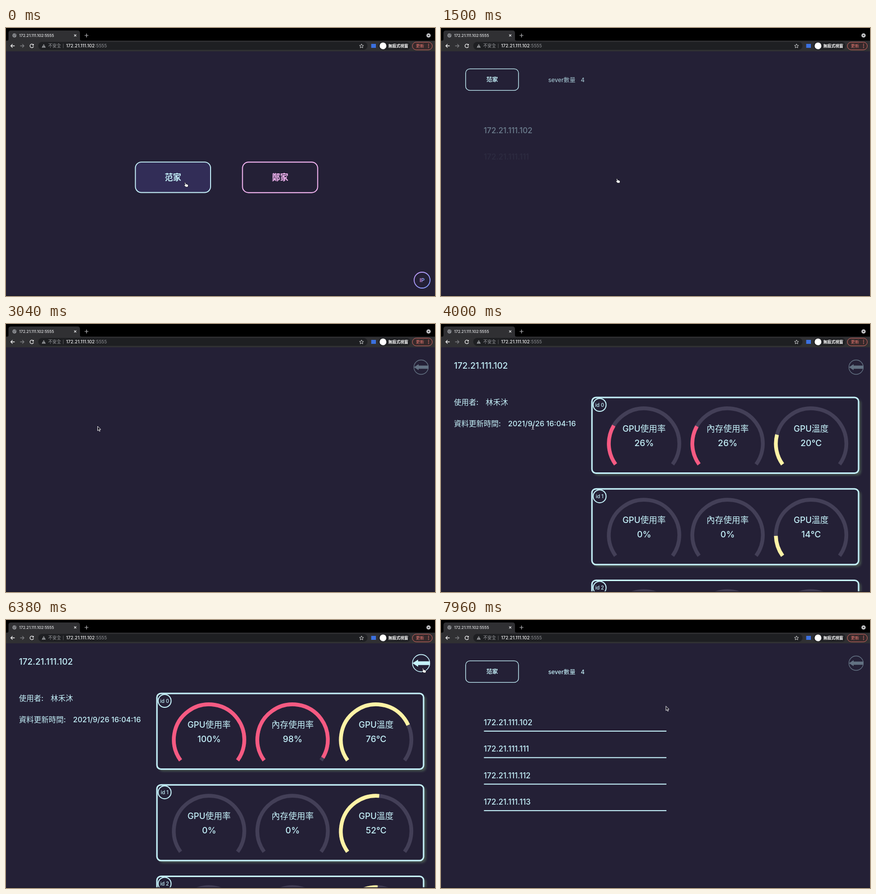
Animation, 864 px wide and 540 px high, one loop 8000 ms. Source, as an HTML page:

```html
<!DOCTYPE html>
<html lang="zh-Hant">
<head>
<meta charset="utf-8">
<title>Server monitor</title>
<style>
  html, body { margin: 0; width: 100%; height: 100%; overflow: hidden; background: #242036; }
  svg { display: block; width: 864px; height: 540px; font-family: Inter, "Noto Sans CJK TC", "Noto Sans CJK", sans-serif; }
  .shadow { filter: blur(2px); }
</style>
</head>
<body>
<svg id="stage" viewBox="0 0 864 540"></svg>
<script>
const LOOP = 8000;
const ICE = '#c5f1fa', PINK = '#f9b9f7', PAGE = '#242036';
const HOST = '172.21.111.102';
const HOSTS = [HOST, '172.21.111.111', '172.21.111.112', '172.21.111.113'];
const GAUGES = [
  { label: 'GPU使用率', unit: '%', color: '#f65a82' },
  { label: '內存使用率', unit: '%', color: '#f65a82' },
  { label: 'GPU溫度', unit: '℃', color: '#fff3a6' }
];
const CARDS = [[100, 98, 76], [0, 0, 52], [0, 0, 51]];

// Markup helpers
const text = (x, y, size, str, attrs = '') =>
  `<text x="${x}" y="${y}" font-size="${size}" ${attrs}>${str}</text>`;
const path = (d, attrs) => `<path d="${d}" ${attrs}/>`;
const line = (color, width = 1.3) => `fill="none" stroke="${color}" stroke-width="${width}"`;
const MID = 'text-anchor="middle"';

const browser = `
  <rect width="864" height="26" fill="#000"/>
  <rect y="25.5" width="864" height="21.5" fill="#303033"/>
  ${path('M1 26Q5 26 5 22V10Q5 5 10 5H144Q149 5 149 10V22Q149 26 153 26Z', 'fill="#303033"')}
  <circle cx="17" cy="15" r="4.2" fill="#8b8d91"/>
  ${path('M14 13.5L17 15.5L16 18M18 11.5L18.5 14L20.5 15', line('#4b4c50', 1))}
  ${text(26.5, 18, 7.8, HOST + ':5555', 'fill="#e6e7e9" font-weight="500"')}
  ${path('M137.3 13L141.5 17.2M141.5 13L137.3 17.2', line('#e6e7e9', 1.1))}
  ${path('M158.3 15H166M162.2 11.2V19', line('#b9babd', 1.2))}
  <circle cx="851" cy="15" r="4.3" fill="#c3c4c7"/>
  ${path('M849 14.2H853L851 16.6Z', 'fill="#111"')}
  ${path('M17.5 36H10M13.3 32.4L9.7 36L13.3 39.6', line('#f1f1f2'))}
  ${path('M28.5 36H36M32.7 32.4L36.3 36L32.7 39.6', line('#7b7c80'))}
  ${path('M54.6 33.6A3.6 3.6 0 1 0 55.4 37', line('#f1f1f2'))}
  ${path('M56 31.8V35.2H52.6Z', 'fill="#f1f1f2"')}
  <rect x="65" y="28" width="663" height="16" rx="8" fill="#1e1f22"/>
  ${path('M76 32.2L80 39.4H72Z', 'fill="#9b9da1"')}
  ${path('M76 34.5V37M76 37.7V38.6', line('#1e1f22', .9))}
  ${text(85, 39.2, 8.6, '不安全', 'fill="#9b9da1"')}
  ${path('M115.3 31.5V40.5', line('#5b5c60', 1))}
  ${text(121, 39.3, 9.2, HOST + '<tspan fill="#8f9195" font-weight="400">:5555</tspan>', 'fill="#f1f1f2" font-weight="500"')}
  ${path('M716 32L717.2 34.9L720.2 35.1L717.9 37L718.6 40L716 38.4L713.4 40L714.1 37L711.8 35.1L714.8 34.9Z', line('#d5d6d8', .9))}
  <rect x="735.5" y="32" width="9.5" height="8" fill="#3b70e0"/>
  <rect x="750" y="28" width="65" height="16" rx="8" fill="#202124"/>
  <circle cx="759.3" cy="36" r="6.8" fill="#fff"/>
  ${text(770, 39.1, 8, '無痕式視窗', 'fill="#fff" font-weight="700"')}
  <rect x="818.5" y="28.5" width="40" height="15.5" rx="7.7" fill="#35292b" stroke="#d56a64"/>
  ${text(825.5, 39.2, 8.2, '更新', 'fill="#ee7b74" font-weight="500"')}
  ${[32.7, 36, 39.3].map(y => `<circle cx="851" cy="${y}" r=".9" fill="#ee7b74"/>`).join('')}`;

const family = (id, name, color, fill) => `<g id="${id}">
  <rect id="${id}Box" x="-75.7" y="-30.7" width="151.4" height="61.4" rx="12" fill="${fill}" stroke="${color}" stroke-width="1.9"/>
  ${text(0, 6.2, 16.6, name, `fill="${color}" font-weight="700" ${MID}`)}</g>`;

const hostRow = (host, i) => `<g id="host${i}">${text(86, 211.8 + i * 53.4, 15.6, host)}</g>
  <rect id="rule${i}" x="86.5" y="${222.9 + i * 53.4}" height="2" width="0"/>`;

const gauge = (card, i) => {
  const cx = 409 + i * 168.2;
  const arc = (color, attrs) => `<circle cx="${cx}" cy="241" r="71" pathLength="360"
    transform="rotate(144 ${cx} 241)" ${line(color, 7.6)} ${attrs}/>`;
  const { label, color } = GAUGES[i];
  return arc('#433f57', 'stroke-dasharray="252 360"') + arc(color, `id="arc${card}${i}"`)
    + text(cx, 217, 17, label, MID) + text(cx, 246, 17.5, '', `id="value${card}${i}" ${MID}`);
};

const card = (_, n) => `<g transform="translate(0 ${n * 184.2})">
  <rect class="shadow" x="308" y="152" width="538" height="153" rx="8" fill="#46534f"/>
  <rect x="304" y="148" width="537" height="152.5" rx="8" fill="${PAGE}" stroke="${ICE}" stroke-width="3"/>
  <circle cx="319.5" cy="163" r="13" ${line(ICE, 2)}/>
  ${text(319.5, 166.6, 10, 'id ' + n, MID)}
  ${GAUGES.map((_, i) => gauge(n, i)).join('')}</g>`;

const cursorStyle = 'fill="#fff" stroke="#15131f" stroke-width=".9" stroke-linejoin="round"';
const stage = document.getElementById('stage');
stage.innerHTML = `
  <defs>
    <linearGradient id="ring" x2="1" y2="1"><stop stop-color="#c49af5"/><stop offset="1" stop-color="#7f9cff"/></linearGradient>
    <linearGradient id="ink"><stop stop-color="#f08be0"/><stop offset="1" stop-color="#66a6ff"/></linearGradient>
  </defs>
  <rect width="864" height="540" fill="${PAGE}"/>
  <g id="start">
    <g transform="translate(552 301)">${family('other', '鄭家', PINK, 'none')}</g>
    <circle cx="838" cy="508" r="16" ${line('url(#ring)', 1.8)}/>
    ${text(838, 511.8, 11, 'IP', `fill="url(#ink)" font-weight="600" ${MID}`)}
  </g>
  ${family('chosen', '范家', ICE, '#322d57')}
  <g fill="${ICE}" font-weight="450">
    <g id="count">${text(216, 109.3, 11.8, 'sever數量')}${text(281.5, 109.3, 11.8, '4')}</g>
    <g id="hosts">${HOSTS.map(hostRow).join('')}</g>
    <g id="detail">
      ${text(26, 90.3, 17.3, HOST)}
      ${text(26, 162.5, 15, '使用者:')}${text(90, 162.5, 15, '林禾沐')}
      ${text(26, 205.5, 15, '資料更新時間:')}${text(135, 205.5, 14.9, '2021/9/26 16:04:16')}
      ${CARDS.map(card).join('')}
    </g>
    <g id="back">
      <circle r="14.5" ${line(ICE, 1.3)}/>
      <path d="M-14.5 0L-5 -6V-3.2H15V3.2H-5V6Z"/>
    </g>
  </g>
  <rect y="538.5" width="864" height="1.5" fill="#1b1929"/>
  ${browser}
  <g id="cursor">
    ${path('M-.6 .8Q.6 -.4 1.5 1L2.6 3.6Q4 2.8 4.6 4Q6 3.6 6.2 4.8Q7.3 4.8 7.1 6.4L6.4 9.4H2.2L-1.4 6Q-1.6 4.6 .8 5Z', `id="hand" ${cursorStyle}`)}
    ${path('M0 0V9L2.1 7.1L3.6 10.3L5 9.6L3.6 6.5H6.3Z', 'id="arrow" fill="#15131f" stroke="#fff" stroke-width=".9"')}
    ${path('M-2 -2.5Q.2 -2.5 .5 -1.2Q.8 -2.5 3 -2.5M.5 -1.5V5.5M-2 6.5Q.2 6.5 .5 5.2Q.8 6.5 3 6.5M-1 3H2', `id="beam" ${line('#e8e8ee', .9)}`)}
  </g>`;

const el = {};
stage.querySelectorAll('[id]').forEach(node => el[node.id] = node);

// Timing helpers
const span = (t, a, b) => Math.min(1, Math.max(0, (t - a) / (b - a)));
const smooth = p => p * p * (3 - 2 * p);
const ramp = (t, a, b) => smooth(span(t, a, b));
const cubicOut = p => 1 - (1 - p) ** 3;
const mix = (a, b, p) => a + (b - a) * p;
const fade = (id, value) => el[id].setAttribute('opacity', value);

// Moves: start, end, x, y
const MOVES = [
  [0, 0, 360, 311], [200, 600, 353.5, 303], [1720, 2400, 184.5, 206],
  [5900, 6340, 839, 97], [7130, 7680, 453, 173.5]
];
const SHAPES = [[0, 'hand'], [2900, 'arrow'], [3560, 'beam'], [5960, 'arrow'], [6290, 'hand'], [7190, 'arrow']];

function drawCursor(t) {
  let x = 0, y = 0;
  for (const [a, b, toX, toY] of MOVES) {
    const p = b ? ramp(t, a, b) : 1;
    x = mix(x, toX, p);
    y = mix(y, toY, p);
  }
  el.cursor.setAttribute('transform', `translate(${x} ${y})`);
  const shape = SHAPES.filter(([from]) => t >= from).pop()[1];
  for (const id of ['hand', 'arrow', 'beam']) fade(id, id === shape ? 1 : 0);
}

function drawList(t) {
  const returning = t > 6000;
  const leave = returning ? 0 : ramp(t, 2540, 3020);
  const grow = ramp(t, 500, 1020), move = ramp(t, 1020, 1400);
  const scale = mix(mix(1, 3, grow), .704, move);
  el.chosen.setAttribute('transform',
    `translate(${mix(336.3, 102.9, move)} ${mix(300.8, 104, move)}) scale(${scale})`);
  el.chosenBox.setAttribute('fill-opacity', 1 - ramp(t, 450, 700));
  fade('chosen', returning ? ramp(t, 7050, 7450) : 1 - leave);
  fade('count', returning ? ramp(t, 7050, 7450) : ramp(t, 1250, 1620) * (1 - leave));
  fade('hosts', 1 - leave);
  const [first, gap, length] = returning ? [7100, 100, 500] : [1220, 200, 600];
  HOSTS.forEach((_, i) => {
    const from = first + i * gap;
    fade('host' + i, ramp(t, from, from + length));
    el['rule' + i].setAttribute('width', 367.5 * ramp(t, from + length / 2, from + length));
  });
}

function drawDetail(t) {
  fade('detail', ramp(t, 3420, 3920) * (1 - ramp(t, 6750, 7150)));
  const p = cubicOut(span(t, 3806, 5806));
  CARDS.forEach((values, n) => values.forEach((value, i) => {
    el[`arc${n}${i}`].setAttribute('stroke-dasharray', `${2.52 * value * p} 360`);
    el[`value${n}${i}`].textContent = Math.round(value * p) + GAUGES[i].unit;
  }));
}

function drawBack(t) {
  const hover = ramp(t, 6230, 6370) * (1 - ramp(t, 7160, 7360));
  el.back.setAttribute('transform', `translate(836 87) scale(${1 + .2 * hover})`);
  fade('back', mix(.39, 1, hover) * ramp(t, 1650, 2150));
}

function draw() {
  const t = performance.now() % LOOP;
  fade('start', 1 - ramp(t, 500, 870));
  drawList(t);
  drawDetail(t);
  drawBack(t);
  drawCursor(t);
  requestAnimationFrame(draw);
}
draw();
</script>
</body>
</html>
```
